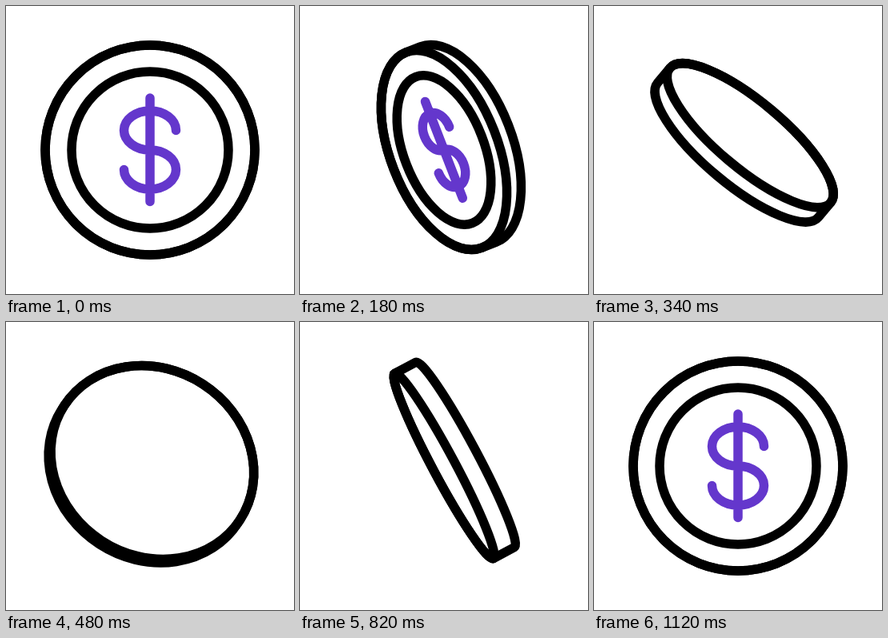
An HTML page with a canvas that plays this animation: 360 by 360 pixels, repeating every 1.4 s.

```html
<!DOCTYPE html>
<html lang="en">
<head>
<meta charset="utf-8">
<title>Spinning coin</title>
<style>
  html, body { margin: 0; height: 100%; overflow: hidden; background: #fff; }
  canvas { display: block; }
</style>
</head>
<body>
<canvas id="stage" width="360" height="360"></canvas>
<script>
const ctx = document.getElementById('stage').getContext('2d');
const LOOP = 1400, HALF = 560, STEP = 20;
const RIM = 131, RING = 98, TILT = 57 * Math.PI / 180, Q = Math.PI / 2;

const ease = u => {
  u = Math.min(1, Math.max(0, u));
  return u * u * (3 - 2 * u);
};

function oval(x, squash, r) {
  ctx.beginPath();
  ctx.ellipse(x, 0, squash * r, r, 0, 0, 4 * Q);
  ctx.stroke();
}

function dollar(x, squash) {
  ctx.save();
  ctx.translate(x, 0);
  ctx.scale(squash, 1);
  ctx.beginPath();
  ctx.moveTo(0, -65);
  ctx.lineTo(0, 64.5);
  ctx.moveTo(32.5, -24.5);
  ctx.ellipse(0, -24.5, 32.5, 24.5, 0, 0, Q, true);
  ctx.ellipse(0, 24.5, 32.5, 24.5, 0, -Q, 2 * Q);
  ctx.restore();
  ctx.strokeStyle = '#6437cc';
  ctx.stroke();
}

function draw(time) {
  const t = Math.min(time, 2 * HALF);
  const second = t >= HALF;
  const local = second ? t - HALF : t;
  const u = local / HALF;
  const turn = 1 - 2 * ease(u);
  const squash = Math.abs(turn);
  const tilt = TILT * (second ? 1 - ease(local / 515) : ease(local / 435));
  const span = second ? 520 : HALF;
  const depth = (second ? 30 : 27) * ease(1 - Math.abs(2 * local / span - 1));
  const near = turn > 0 ? 0 : depth;
  const headsUp = second === turn < 0;

  ctx.setTransform(1, 0, 0, 1, 0, 0);
  ctx.fillStyle = '#fff';
  ctx.fillRect(0, 0, 360, 360);
  ctx.translate(180, 180);
  ctx.rotate(-tilt);
  ctx.lineWidth = 11.5;
  ctx.lineCap = ctx.lineJoin = 'round';
  ctx.strokeStyle = '#000';

  // Silhouette of both faces and the edge between them
  ctx.beginPath();
  ctx.ellipse(depth, 0, squash * RIM, RIM, 0, -Q, Q);
  ctx.ellipse(0, 0, squash * RIM, RIM, 0, Q, 3 * Q);
  ctx.closePath();
  ctx.stroke();

  oval(near, squash, RIM);
  if (headsUp) {
    oval(near, squash, RING);
    dollar(near, squash);
  }
}

const start = performance.now();
function tick() {
  const time = (performance.now() - start) % LOOP;
  draw(Math.floor(time / STEP) * STEP);
  requestAnimationFrame(tick);
}
tick();
</script>
</body>
</html>
```
